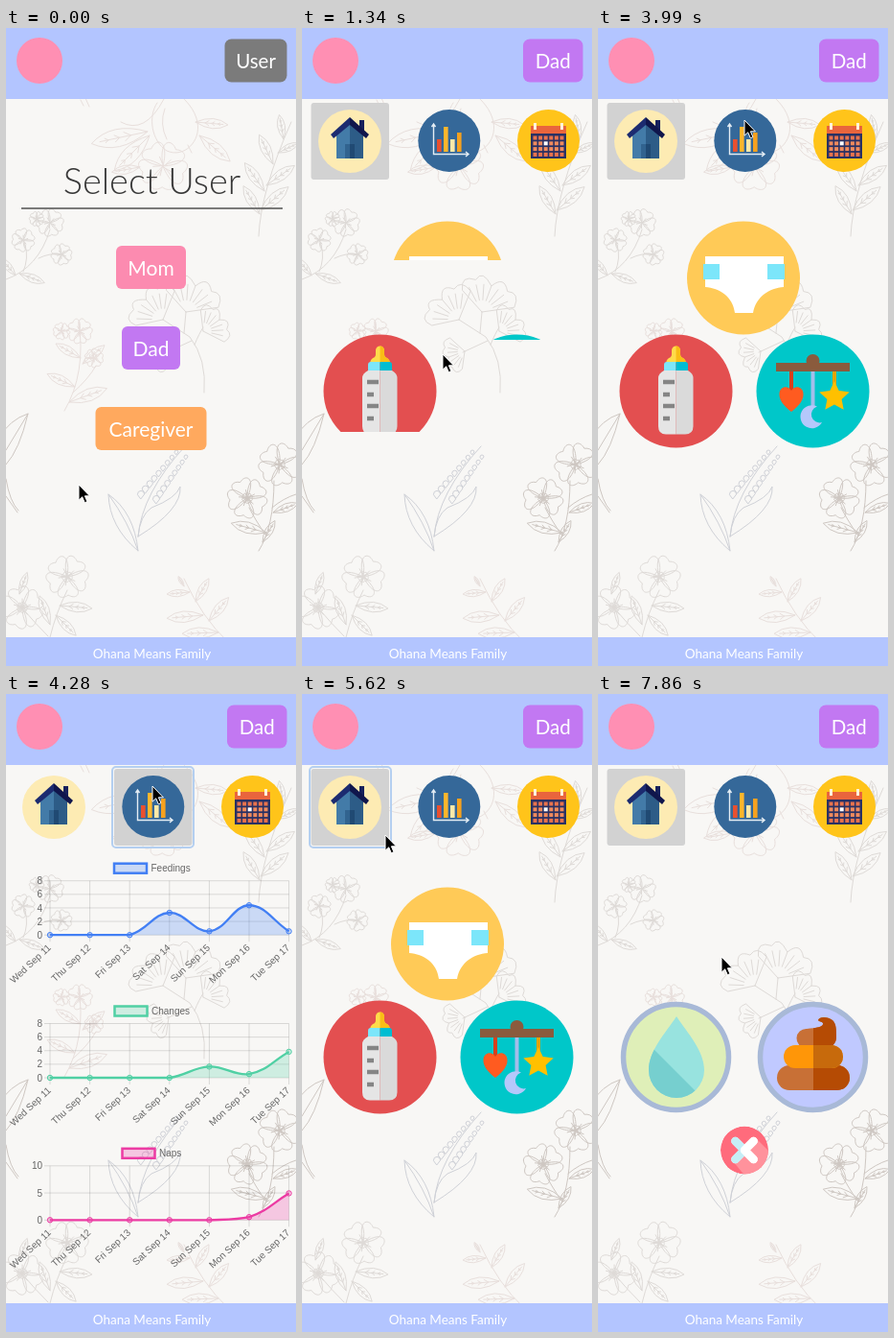
Animation of 303 by 665 pixels, one loop 8000 ms. Source, as an HTML page:

```html
<!DOCTYPE html>
<html lang="en">
<head>
<meta charset="utf-8">
<title>Baby tracker</title>
<style>
html, body { margin: 0; width: 100%; height: 100%; overflow: hidden; background: #f8f7f5; }
svg { display: block; width: 303px; height: 665px; }
.ui { font-family: Lato, "Open Sans", sans-serif; font-weight: 300; text-anchor: middle; fill: #fff; }
.bold { font-weight: 400; }
.axis { font: 10px "Liberation Sans", Arial, sans-serif; fill: #666; }
</style>
</head>
<body>
<svg viewBox="0 0 303 665" xmlns="http://www.w3.org/2000/svg">
  <defs>
    <clipPath id="load0"><rect x="90" y="201" width="125" height="120"/></clipPath>
    <clipPath id="load1"><rect x="20" y="319" width="125" height="120"/></clipPath>
    <clipPath id="load2"><rect x="162" y="319" width="125" height="120"/></clipPath>
    <clipPath id="load3"><rect x="162" y="319" width="125" height="120"/></clipPath>
    <clipPath id="dropClip"><path d="M82 336C94 354 111 372 111 392A29 29 0 0 1 53 392C53 372 70 354 82 336Z"/></clipPath>
    <clipPath id="crossClip"><circle cx="153" cy="475.5" r="25"/></clipPath>
    <g id="swirl">
      <rect x="187" y="387" width="76" height="26" rx="13"/>
      <path id="tip" d="M218 349C228 348 236 347 235 343C234 341 231 342 230 340C231 336 240 336 245 340C249 344 249 349 249 358A11 11 0 0 1 238 369H217A10 10 0 0 1 218 349Z"/>
    </g>
    <clipPath id="rightHalf"><rect x="225" y="330" width="50" height="95"/></clipPath>
  </defs>

  <rect width="303" height="665" fill="#f8f7f5"/>
  <g id="plants" fill="none" stroke-linecap="round" stroke-linejoin="round"></g>

  <g id="select">
    <text class="ui" x="152.500" y="173" font-size="38" style="fill:#383838">Select User</text>
    <path d="M16 188H289" stroke="#505050" stroke-width="1.5"/>
    <g id="users" class="ui bold" font-size="21"></g>
  </g>

  <g id="nav">
    <rect id="pick" y="78" width="81.500" height="80" rx="3" fill="#d2d2d2"/>
    <rect id="ring" y="76" width="85" height="84" rx="4" fill="none" stroke="#b4cff0" stroke-width="2"/>
    <circle cx="50" cy="118" r="33" fill="#fdebb3"/>
    <path d="M36 136V110L50 97V136Z" fill="#437ba8"/>
    <path d="M50 136V97L64 110V136Z" fill="#2d5c87"/>
    <path d="M45 121H50V136H45Z" fill="#31638f"/>
    <path d="M50 121H55V136H50Z" fill="#204a73"/>
    <path d="M60 96H65V108L60 104Z" fill="#16205b"/>
    <path d="M50 93L30 111L33 115L50 101Z" fill="#1c2b70"/>
    <path d="M50 93L70 111L67 115L50 101Z" fill="#10164c"/>
    <circle cx="153.800" cy="117.500" r="32.500" fill="#356899"/>
    <g id="bars"></g>
    <path d="M137.500 100V131.500H173M135.500 103L137.500 100L139.500 103M171 129L174 131.500L171 134" fill="none" stroke="#e4edf4" stroke-width="1.400"/>
    <circle cx="257.500" cy="117.500" r="32.500" fill="#ffc41a"/>
    <path d="M239 102H276V110H239Z" fill="#e9653d"/>
    <path d="M239 110H276V136H239Z" fill="#2a3163"/>
    <path d="M242 99H245V106H242ZM270 99H273V106H270Z" fill="#fff3dc"/>
    <g id="days"></g>
  </g>

  <g id="home">
    <g clip-path="url(#load0)">
      <circle cx="152" cy="260.500" r="59" fill="#ffca57"/>
      <path d="M112 238H194V270C179 271 165 280 162 297H143C141 280 127 271 112 270Z" fill="#fff"/>
      <path d="M110 246H127V262H110ZM177 246H195V262H177Z" fill="#7ce6fa"/>
    </g>
    <g clip-path="url(#load1)">
      <circle cx="81.500" cy="378.500" r="59" fill="#e34f50"/>
      <path d="M77 336a4.500 4.500 0 0 1 9 0V340Q86 343 89 344Q92 346 92 349H71Q71 346 74 344Q77 343 77 340Z" fill="#ffdc4b"/>
      <path d="M81.500 331.500a4.500 4.500 0 0 1 4.500 4.500V340Q86 343 89 344Q92 346 92 349H81.500Z" fill="#f9bd16"/>
      <path d="M72 348H81.500V358H69V351Q69 348 72 348Z" fill="#7ce6fa"/>
      <path d="M81.500 348H91Q94 348 94 351V358H81.500Z" fill="#00bdd2"/>
      <path d="M69 357H81.500V423.500H71Q63 423.500 63 415V365Q63 360 69 357Z" fill="#e5e5e5"/>
      <path d="M81.500 357H94Q99.500 360 99.500 365V415Q99.500 423.500 91 423.500H81.500Z" fill="#dadada"/>
      <path d="M68 369H80M68 382H75M68 394H80M68 407H75" stroke="#858585" stroke-width="4.500"/>
    </g>
    <g clip-path="url(#load2)">
      <circle cx="224.500" cy="378.500" r="59" fill="#00c7c9"/>
      <path d="M202 357V378" stroke="#d8401c" stroke-width="4"/>
      <path d="M224.500 357V396" stroke="#a4bdea" stroke-width="4"/>
      <path d="M247 357V372" stroke="#e2a400" stroke-width="4"/>
      <circle cx="224.500" cy="347" r="7" fill="#8a5b3d"/>
      <path d="M186 349H263V358H186Z" fill="#8a5b3d"/>
      <path d="M202 400C193 393 189 387 189.500 381C190 373 199 372 202 378C205 372 214 373 214.500 381C215 387 211 393 202 400Z" fill="#ff5b20"/>
      <path d="M229 394.500A12 12 0 1 0 234 411A8.500 8.500 0 0 1 229 394.500Z" fill="#b5c8fb"/>
      <path id="star" fill="#ffc000"/>
    </g>
  </g>

  <g id="charts"></g>

  <g id="diaper">
    <circle cx="81.500" cy="378.500" r="55" fill="#dfefb8" stroke="#a8b9d7" stroke-width="5.500"/>
    <g clip-path="url(#dropClip)">
      <path d="M50 330H115V425H50Z" fill="#98e3df"/>
      <path d="M45 357L115 427H45Z" fill="#76cfcf"/>
    </g>
    <g clip-path="url(#load3)">
      <circle cx="224.500" cy="378.500" r="55" fill="#c0c9ff" stroke="#a8b9d7" stroke-width="5.500"/>
      <use href="#swirl" fill="#c87036"/>
      <use href="#swirl" fill="#b54b04" clip-path="url(#rightHalf)"/>
      <rect x="194" y="366" width="62" height="24" rx="12" fill="#ff9608"/>
      <path d="M225 366H244A12 12 0 0 1 244 390H225Z" fill="#c76a0c"/>
    </g>
    <g clip-path="url(#crossClip)">
      <circle cx="153" cy="475.500" r="25" fill="#ff6b7c"/>
      <path d="M141 487L165 463L190 488L160 510Z" fill="#ff929c"/>
      <path d="M143.500 466L162.500 485M162.500 466L143.500 485" stroke="#fff" stroke-width="8.500" stroke-linecap="round"/>
      <path d="M143.500 466L150 472.500M143.500 485L150 478.500" stroke="#c5eef6" stroke-width="8.500" stroke-linecap="round"/>
      <path d="M153 475.500L162.500 466M153 475.500L162.500 485" stroke="#fff" stroke-width="8.500" stroke-linecap="round"/>
    </g>
  </g>

  <rect width="303" height="74" fill="#b3c5ff"/>
  <rect y="635" width="303" height="30" fill="#b3c5ff"/>
  <circle cx="35" cy="34" r="24" fill="#ff8fb3"/>
  <rect id="badge" y="11.500" height="45" rx="7"/>
  <text id="who" class="ui bold" y="42" font-size="20.500"></text>
  <text class="ui bold" x="152.500" y="656.500" font-size="13.500">Ohana Means Family</text>
  <path id="cursor" d="M0 0V16.200L3.700 12.800L6.300 18.800L8.900 17.600L6.400 11.800H11.400Z" stroke="#fff" stroke-width="1"/>
</svg>

<script>
const $ = id => document.getElementById(id);
const LOOP = 8000;

// ---- line-art plants ----
const at = (x, y, deg, d) => [x + d * Math.cos(deg * Math.PI / 180), y + d * Math.sin(deg * Math.PI / 180)];
const p = (...a) => at(...a).map(v => v.toFixed(1)).join(' ');

function leaf(x, y, a, len, spread = 28) {
  const tip = p(x, y, a, len);
  let d = `M${x} ${y}Q${p(x, y, a - spread, len * .65)} ${tip}Q${p(x, y, a + spread, len * .65)} ${x} ${y}L${p(x, y, a, len * .85)}`;
  for (const k of [.3, .5, .7]) {
    const m = at(x, y, a, len * k);
    for (const s of [-35, 35]) d += `M${m}L${p(...m, a + s, len * spread * .006 * (1.1 - k))}`;
  }
  return d;
}

function flower(x, y, r, a = 0, n = 5) {
  let d = '';
  for (let i = 0; i < n; i++) {
    const b = a + i * 360 / n;
    d += `M${x} ${y}C${p(x, y, b - 48, r * 1.25)} ${p(x, y, b - 20, r * 1.35)} ${p(x, y, b, r * .95)}`
       + `C${p(x, y, b + 20, r * 1.35)} ${p(x, y, b + 48, r * 1.25)} ${x} ${y}`
       + `M${p(x, y, b + 20, r * .15)}L${p(x, y, b + 14, r * .45)}`;
  }
  return d;
}

function fan(x, y, a, r) {
  let d = `M${x} ${y}L${p(x, y, a - 62, r * .85)}`;
  for (let s = -62; s < 62; s += 31)
    d += `Q${p(x, y, a + s + 12, r * 1.25)} ${p(x, y, a + s + 31, r * (s === -31 ? .8 : .95))}`;
  d += `L${x} ${y}`;
  for (let s = -48; s <= 48; s += 16) d += `M${p(x, y, a + s, r * .35)}L${p(x, y, a + s, r * .8)}`;
  return d;
}

const bud = (x, y, r) => `M${x - r} ${y}a${r} ${r} 0 1 1 ${2 * r} 0l${-r} ${r * 1.3}Z`;

function drawPlants() {
  const add = (color, ...parts) =>
    $('plants').insertAdjacentHTML('beforeend', `<path stroke="${color}" d="${parts.join('')}"/>`);
  const pale = '#e8dfdc', mid = '#dedad7', dark = '#cec7c2', blue = '#cfd1d7';

  // lemon branch
  add(pale, 'M158 78C148 92 152 118 168 128C186 136 204 118 200 98C197 84 188 76 182 70',
    'M120 98Q145 112 165 74M166 84Q160 100 168 116M190 122l4 8',
    leaf(148, 108, 168, 60), leaf(150, 112, 135, 52), leaf(198, 98, 5, 34), leaf(202, 112, 40, 42),
    flower(164, 144, 23, 20), leaf(140, 145, 170, 30), 'M78 75l3 6M83 73l4 9');
  // right sprig
  add(mid, 'M264 217Q266 170 298 98', leaf(265, 194, -120, 34), leaf(266, 190, -40, 38),
    leaf(270, 170, -125, 36), leaf(272, 164, -35, 36), leaf(279, 142, -115, 34), leaf(284, 130, -25, 24), leaf(290, 116, -100, 26));
  // left blossoms
  add(mid, 'M0 262Q34 250 46 210M18 254Q24 240 20 226M34 240Q46 234 58 236', flower(46, 203, 13, 10),
    flower(18, 221, 11, 40), flower(58, 236, 10, 5), flower(32, 199, 7, 20), leaf(10, 258, -130, 24), leaf(14, 256, 20, 28));
  // ginkgo
  add(mid, 'M207 380Q210 345 192 322L164 304M197 330Q202 318 206 312M186 318L188 296M194 326L168 338',
    fan(164, 304, -130, 34), fan(188, 296, -70, 36), fan(206, 316, -35, 26), fan(170, 337, 160, 22));
  // left centre sprig
  add(pale, 'M61 399Q84 360 76 306M70 380Q86 366 94 352', leaf(72, 374, -155, 32), leaf(78, 344, -150, 30),
    leaf(66, 390, -20, 42), leaf(80, 350, -40, 30), flower(77, 316, 12, 15), flower(92, 344, 9, 0), flower(58, 316, 8, 30));
  // left edge leaf
  add(dark, 'M0 455Q14 440 23 402Q4 408 -8 428M0 440L23 402M0 470Q4 494 13 503M0 488L12 505');
  // lily of the valley
  const bells = [];
  for (let i = 0; i < 9; i++) {
    const k = i / 8, x = 184 - 34 * k, y = 440 + 44 * k;
    bells.push(bud(x - 6 - 3 * k, y + 2, 2 + 1.6 * k), bud(x + 4 + 3 * k, y + 7, 2 + 1.6 * k));
  }
  add(blue, 'M138 530Q142 485 187 436', 'M138 545Q134 505 107 486Q108 520 138 545Q128 515 107 486',
    'M138 530Q140 508 152 500Q178 490 182 478Q184 502 138 530', ...bells);
  // right blossoms
  add(dark, 'M264 545Q280 520 280 472M271 528Q260 512 254 500M278 500Q290 490 303 486', flower(286, 455, 20, 10),
    flower(252, 490, 19, 30), flower(286, 455, 5), flower(252, 490, 5), leaf(272, 526, -165, 38), leaf(279, 505, -20, 28), leaf(268, 536, -60, 26));
  // bottom blossoms
  add(mid, 'M46 635Q52 610 64 586M44 634Q30 620 20 608', flower(64, 572, 20, 15), flower(17, 604, 20, 40),
    flower(64, 572, 5), flower(17, 604, 5), leaf(56, 602, 5, 34), leaf(52, 612, 45, 30), leaf(46, 622, -110, 32), leaf(14, 590, -70, 24));
  add(pale, 'M232 640Q205 615 186 574', leaf(192, 588, 175, 24), leaf(198, 598, -60, 28), leaf(206, 612, 175, 38),
    leaf(212, 618, -50, 32), leaf(222, 630, 178, 38), leaf(186, 582, -120, 12));
}

// ---- small parts ----
const rect = (x, y, w, h, fill, rx = 0) => `<rect x="${x}" y="${y}" width="${w}" height="${h}" rx="${rx}" fill="${fill}"/>`;

function drawParts() {
  $('users').innerHTML = [['Mom', 115, 73, 227, '#fc8bb0'], ['Dad', 121, 61, 311, '#c278f2'], ['Caregiver', 93.5, 116, 395, '#ffa95e']]
    .map(([s, x, w, y, c]) => rect(x, y, w, 45, c, 6) + `<text x="${x + w / 2}" y="${y + 31}">${s}</text>`).join('');
  $('bars').innerHTML = [[141, 116, '#e9502f'], [148, 103, '#ffb62c'], [155, 116, '#ffe9a8'], [162, 109, '#f6a11f']]
    .map(([x, y, c]) => rect(x, y, 4.6, 129 - y, c)).join('');
  let days = '';
  for (let r = 0; r < 4; r++) for (let c = 0; c < 6; c++)
    days += rect(241.5 + c * 5.6, 112.5 + r * 5.8, 4, 4, r === 1 && c === 2 ? '#fff' : r % 3 ? '#f08a5c' : '#e9734d');
  $('days').innerHTML = days;
  $('star').setAttribute('d', 'M' + Array.from({ length: 10 }, (_, i) => p(247, 384.5, i * 36 - 90, i % 2 ? 8 : 16.5)).join('L') + 'Z');
}

// ---- line charts ----
const X0 = 46, DX = 41.6, PLOT = 56.5;
const days = ['Wed Sep 11', 'Thu Sep 12', 'Fri Sep 13', 'Sat Sep 14', 'Sun Sep 15', 'Mon Sep 16', 'Tue Sep 17'];
const series = [
  { name: 'Feedings', base: 251.2, max: 8, step: 2, key: 112, color: '#427ff4', data: [0, 0, 0, 6, 1, 8, 1] },
  { name: 'Changes', base: 400, max: 8, step: 2, key: 112.5, color: '#50d0a4', data: [0, 0, 0, 0, 3, 1, 7] },
  { name: 'Naps', base: 548.3, max: 10, step: 5, key: 120.5, color: '#ec3ba3', data: [0, 0, 0, 0, 0, 1, 9] }
];

function buildChart(s) {
  let grid = '', text = '';
  for (let v = 0; v <= s.max; v += s.step) {
    const y = s.base - v / s.max * PLOT;
    grid += `M40 ${y}H${X0 + 6 * DX}`;
    text += `<text x="38" y="${y + 3.6}" text-anchor="end">${v}</text>`;
  }
  days.forEach((d, i) => {
    const x = X0 + i * DX;
    grid += `M${x} ${s.base - PLOT}V${s.base + 7}`;
    text += `<text transform="translate(${x + 1.5} ${s.base + 14}) rotate(-43)" text-anchor="end">${d}</text>`;
  });
  const top = s.base - 75;
  const g = document.createElementNS('http://www.w3.org/2000/svg', 'g');
  g.innerHTML = `<path d="${grid}" stroke="#000" stroke-opacity=".13" fill="none"/>`
    + `<rect x="${s.key + 1}" y="${top + .5}" width="34" height="10" fill="${s.color}" fill-opacity=".25" stroke="${s.color}" stroke-width="2.5"/>`
    + `<g class="axis">${text}<text x="${s.key + 39.5}" y="${top + 9}">${s.name}</text></g>`
    + `<path fill="${s.color}" fill-opacity=".25"/><path fill="none" stroke="${s.color}" stroke-width="2.3"/>`
    + `<g fill="${s.color}" fill-opacity=".25" stroke="${s.color}">${'<circle r="2.7"/>'.repeat(7)}</g>`;
  $('charts').append(g);
  const [area, line, dots] = [...g.children].slice(-3);
  Object.assign(s, { area, line, dots: [...dots.children], pts: spline(s) });
}

// points with smooth control handles; y is height above the base
function spline(s) {
  const pts = s.data.map((v, i) => ({ x: X0 + i * DX, y: v / s.max * PLOT }));
  const cap = y => Math.max(0, Math.min(PLOT, y));
  return pts.map((c, i) => {
    const a = pts[i - 1] || c, b = pts[i + 1] || c;
    const d0 = Math.hypot(c.x - a.x, c.y - a.y), d1 = Math.hypot(b.x - c.x, b.y - c.y);
    const k0 = .4 * d0 / (d0 + d1), k1 = .4 * d1 / (d0 + d1);
    return { ...c, inX: c.x - k0 * (b.x - a.x), inY: cap(c.y - k0 * (b.y - a.y)),
      outX: c.x + k1 * (b.x - a.x), outY: cap(c.y + k1 * (b.y - a.y)) };
  });
}

function growChart(s, k) {
  const Y = h => (s.base - h * k).toFixed(2);
  let d = '';
  s.pts.forEach((c, i) => {
    const a = s.pts[i - 1];
    d += a ? `C${a.outX} ${Y(a.outY)} ${c.inX} ${Y(c.inY)} ${c.x} ${Y(c.y)}` : `M${c.x} ${Y(c.y)}`;
    s.dots[i].setAttribute('cx', c.x);
    s.dots[i].setAttribute('cy', Y(c.y));
  });
  s.line.setAttribute('d', d);
  s.area.setAttribute('d', `${d}V${s.base}H${X0}Z`);
}

// ---- timeline ----
// bursts of movement: start, end, number of steps
const bursts = [[450, 900, 4], [1190, 1490, 3], [2240, 2960, 6], [3260, 4280, 8],
  [4430, 5470, 8], [5620, 6370, 6], [6820, 7420, 5], [7710, 7860, 2]];
const ticks = bursts.flatMap(([a, b, n]) => Array.from({ length: n }, (_, i) => a + (b - a) * i / (n - 1)));
const hold = t => ticks.reduce((last, v) => v <= t + .5 ? v : last, 0);

const path = [[0, 76, 476], [300, 76, 476], [900, 147, 340], [2100, 147, 340], [2960, 155, 138], [3110, 155, 138],
  [3980, 153, 96], [4430, 153, 96], [5170, 69, 116], [5470, 68, 117], [5620, 87, 147], [6370, 100, 336],
  [6675, 100, 336], [7270, 127, 229], [7420, 129, 274], [LOOP, 129, 274]];

function cursorAt(t) {
  const i = path.findIndex((k, n) => n && t <= k[0]);
  const [a, b] = [path[i - 1], path[i]];
  const u = (t - a[0]) / (b[0] - a[0]), e = u * u * (3 - 2 * u);
  return [a[1] + (b[1] - a[1]) * e, a[2] + (b[2] - a[2]) * e];
}

const show = (id, on) => $(id).style.display = on ? '' : 'none';
const set = (id, o) => { for (const k in o) $(id).setAttribute(k, o[k]); };
const loaded = (n, h) => $('load' + n).firstElementChild.setAttribute('height', h);

function render(time) {
  const t = hold(time);
  const screen = t < 1190 ? 'select' : t < 4120 ? 'home' : t < 5465 ? 'charts' : t < 7705 ? 'home' : 'diaper';
  for (const id of ['select', 'home', 'charts', 'diaper']) show(id, id === screen);

  const dad = screen !== 'select', charts = screen === 'charts';
  show('nav', dad);
  show('ring', t >= 4120 && t < 7705);
  set('pick', { x: charts ? 113 : 9.5 });
  set('ring', { x: charts ? 111 : 8 });
  set('badge', dad ? { x: 231, width: 62.5, fill: '#c278f2' } : { x: 228.5, width: 65, fill: '#7b7b7b' });
  set('who', { x: dad ? 262.3 : 261 });
  $('who').textContent = dad ? 'Dad' : 'User';

  loaded(0, t < 1335 ? 0 : t < 1485 ? 41 : 120);
  loaded(1, t < 1335 ? 0 : t < 1485 ? 102 : 120);
  loaded(2, t < 1335 ? 0 : t < 1485 ? 6 : t > 5460 && t < 5610 ? 50 : 120);
  loaded(3, t < 7855 ? 60 : 120);

  if (charts) {
    const u = Math.min(1, (t - 4100) / 1000), k = 1 - (1 - u) ** 4;
    series.forEach(s => growChart(s, k));
  }
  set('cursor', { transform: `translate(${cursorAt(t)})` });
}

drawPlants();
drawParts();
series.forEach(buildChart);
const start = performance.now();
function frame() {
  render((performance.now() - start) % LOOP);
  requestAnimationFrame(frame);
}
frame();
</script>
</body>
</html>
```
